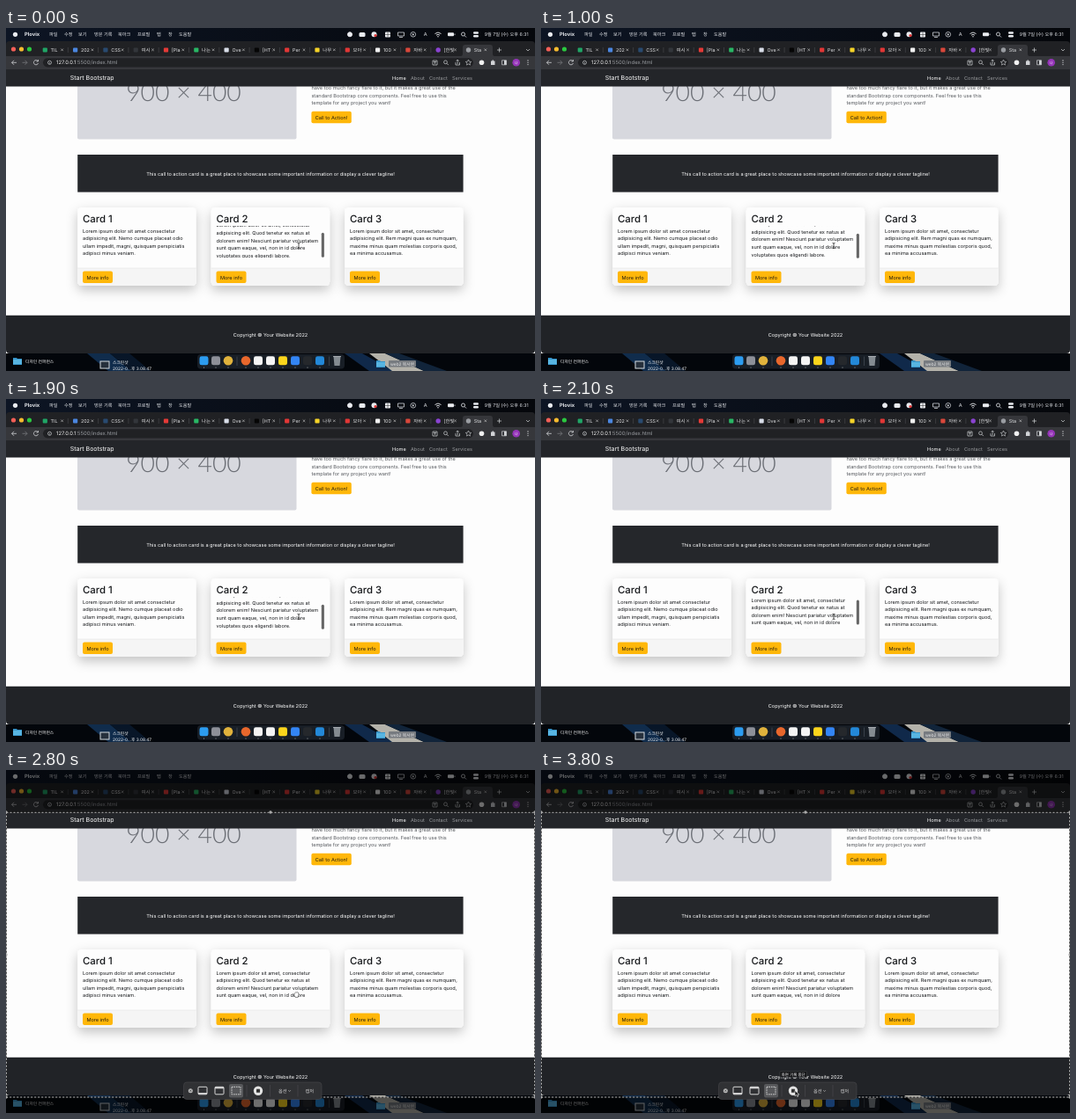
Recreate the animation shown at these times as an HTML page. Size 600 px wide and 390 px high, loop 3900 ms.

```html
<!DOCTYPE html>
<html lang="ko">
<head>
<meta charset="utf-8">
<title>Scrolling card</title>
<style>
html, body { margin: 0; width: 100%; height: 100%; overflow: hidden; background: #000; }
svg { display: block; width: 600px; height: 390px; font-family: Inter, "Noto Sans CJK KR", "Noto Sans CJK", sans-serif; }
text { text-rendering: geometricPrecision; }
</style>
</head>
<body>
<script>
const rect = (x, y, w, h, fill, more = '') =>
  `<rect x="${x}" y="${y}" width="${w}" height="${h}" fill="${fill}" ${more}/>`;
const dot = (x, y, r, fill, more = '') => `<circle cx="${x}" cy="${y}" r="${r}" fill="${fill}" ${more}/>`;
const line = (d, color, width = .8, more = '') =>
  `<path d="${d}" fill="none" stroke="${color}" stroke-width="${width}" ${more}/>`;
const shape = (d, fill, more = '') => `<path d="${d}" fill="${fill}" ${more}/>`;
const text = (x, y, str, size, fill, more = '') =>
  `<text x="${x}" y="${y}" font-size="${size}" fill="${fill}" ${more}>${str}</text>`;
const BODY = 5.6;
const lines = (x, y, rows, fill) => rows.map((row, i) => text(x, y + i * 8.57, row, BODY, fill)).join('');
const button = (x, y, w, label) =>
  rect(x, y, w, 13.6, '#ffb70a', 'rx="2"') + text(x + w / 2, y + 9, label, BODY, '#211c10', 'text-anchor="middle"');

function desktop() {
  const icons = [[224.5, '#2c9cf0'], [238, '#8d9099'], [252, '#e0b23c', 1], [272, '#e8672c', 1], [286, '#f4f4f4'],
    [300, '#f4f4f4'], [314, '#fbd51c'], [328, '#3385f5'], [342, '#25282c'], [356, '#2388d8']];
  const folder = (x, y) => shape(`M${x - 5} ${y - 4}h4l1 1h5v7h-10z`, '#3794c9') + rect(x - 5, y - 2, 10, 5, '#58b5e2');
  return rect(0, 365, 600, 25, '#03060b') +
    shape('M92 370H118L142 390H116z', '#102c4c') + shape('M118 370H140L164 390H142z', '#081628') +
    shape('M384 370H404L440 390H412z', '#10294a') + shape('M412 370H430L474 390H438z', '#b4b2aa') +
    shape('M430 370H446L500 390H474z', '#11243a') +
    folder(13, 379) + text(22, 381, '디자인 컨퍼런스', 4.8, '#fff') +
    rect(106.5, 378.5, 11, 9, '#d5dbe0') + rect(107.5, 379.5, 9, 7, '#26303c') +
    text(121, 382, '스크린샷', 4.8, '#fff') + text(121, 388.5, '2022-0…후 3.08.47', 4.8, '#fff') +
    folder(425, 382) + rect(434, 378, 31, 7.5, '#777b80', 'rx="1"') + text(436, 383.6, 'web2 복사본', 4.8, '#e8e8e8') +
    rect(217, 371, 167, 16.5, '#2a323c', 'rx="4" opacity=".55"') +
    icons.map(([x, c, round]) => round ? dot(x, 378.3, 5.3, c) : rect(x - 5, 373.3, 10, 10, c, 'rx="2.4"')).join('') +
    line('M262 373.5V384M366.5 373.5V384', '#5a636c', .5) +
    shape('M371.5 373.5h8l-1 10.5h-6z', '#848b91') + line('M371 373.5h9', '#c0c4c8', .8) +
    icons.map(([x]) => dot(x, 386, .5, '#ccc')).join('');
}

function menuBar() {
  const items = [[49, '파일'], [66, '수정'], [82, '보기'], [100, '방문 기록'], [127, '북마크'], [149, '프로필'],
    [171, '탭'], [184, '창'], [196, '도움말']];
  const ink = '#e9ebef';
  return rect(0, 0, 600, 20, 'url(#sky)') + dot(10.5, 7.3, 2.6, ink) +
    text(21, 9.3, 'Plovix', 5.8, ink, 'font-weight="700"') +
    items.map(([x, s]) => text(x, 9.2, s, 5.2, ink)).join('') +
    dot(390, 7.3, 2.5, ink, `stroke="${ink}"`) + rect(400.5, 5, 7, 5, ink, 'rx="1.5"') +
    dot(417.5, 7.3, 3, ink) + dot(419, 8.5, 1.6, '#d33') +
    rect(430, 4.5, 6, 6, ink, 'rx="1"') + line('M433 4.5v6M430 7.5h6', '#222', .5) +
    line('M444.5 5h7v4h-7zM446 10.5h4', ink, .7) +
    dot(461.8, 7.3, 2.8, 'none', `stroke="${ink}" stroke-width=".7"`) + shape('M461 5.9v2.8l2-1.4z', ink) +
    text(473.8, 9.3, 'A', 5.6, ink) +
    line('M486.5 6.5q3.5-3 7 0M488 8.2q2-1.8 4 0', ink, .9) + dot(490, 9.7, .7, ink) +
    rect(501, 5.3, 7, 4, ink, 'rx="1"') + line('M509 6.5v1.6', ink, .7) +
    dot(518.5, 7, 2, 'none', `stroke="${ink}" stroke-width=".8"`) + line('M520 8.5l2 2', ink) +
    rect(530, 4.3, 6, 2.5, ink, 'rx="1.2"') + rect(530, 8, 6, 2.5, ink, 'rx="1.2"') +
    text(592.5, 9.3, '9월 7일 (수) 오후 6:31', 5.2, ink, 'text-anchor="end"');
}

function browserBars() {
  const tabs = [['TIL', '#20a566'], ['202', '#4b86df'], ['CSS', '#294a70'], ['여시', '#33363b'], ['[Pla', '#e33a37'],
    ['나는', '#29b765'], ['Ove', '#d8dde8'], ['[HT', '#050505'], ['Per', '#e13736'], ['나무', '#f5d328'],
    ['모아', '#e13736'], ['100', '#f1f1f1'], ['자바', '#d9473b'], ['[한빛', '#8a43d1'], ['Sta', '#9a9da2']];
  const ink = '#d2d4d7';
  return rect(0, 15, 600, 40, '#202124', 'rx="4"') +
    ['#f65f57', '#f9bc2f', '#2bc840'].map((c, i) => dot(8.5 + 9 * i, 24, 2.6, c)).join('') +
    shape('M516 32q2 0 2-3v-7q0-3 3-3h28q3 0 3 3v7q0 3 2 3z', '#36373b') +
    tabs.map(([label, c], i) => {
      const x = 44.3 + 34.3 * i;
      return (i < 13 ? rect(x - 2.6, 22.4, 5.2, 5.2, c, 'rx="1"') : dot(x, 25, 2.7, c)) +
        text(x + 6.3, 27, label, 5.4, '#e2e3e5') + line(`M${x + 18} 23.5l2.6 2.6M${x + 20.6} 23.5l-2.6 2.6`, '#ccc', .6) +
        (i < 13 ? line(`M${x + 26} 22v6`, '#54565a', .5) : '');
    }).join('') +
    line('M557 25h5M559.5 22.5v5M590 24l2 2l2-2', ink, .7) +
    rect(0, 32, 600, 15, '#36373b') + rect(42, 34.2, 488, 10.2, '#202124', 'rx="5.1"') +
    line('M12 39.3H6.5M9 36.8l-2.5 2.5l2.5 2.5', ink) + line('M18.5 39.3H24M21.5 36.8l2.5 2.5l-2.5 2.5', '#77797d') +
    line('M36 37.5a2.6 2.6 0 1 0 .5 2.5M36.5 36v2h-2', ink) +
    dot(49.5, 39.3, 2, 'none', `stroke="${ink}" stroke-width=".7"`) + line('M49.5 39v1.4', ink, .6) +
    text(57, 41.4, '127.0.0.1<tspan fill="#999ca1">:5500/index.html</tspan>', 5.9, '#eee') +
    line('M484 37h5v5h-5zM485 38.5h3M486.5 38.5v2.5', ink, .7) +
    dot(498.5, 38.8, 1.9, 'none', `stroke="${ink}" stroke-width=".7"`) + line('M500 40.3l1.8 1.8', ink) +
    line('M510 39v3h4.5v-3M512.2 41v-5M510.7 37.5l1.5-1.5l1.5 1.5', ink, .7) +
    shape('M524.5 36l1 2.2l2.2 .2l-1.7 1.5l.5 2.2l-2-1.2l-2 1.2l.5-2.2l-1.7-1.5l2.2-.2z', 'none', `stroke="${ink}" stroke-width=".6"`) +
    dot(539.5, 39.3, 2.8, '#f1f1f1') + shape('M550 37.5h1.5v-1h1.5v1h1.5v4.5h-4.5z', ink) +
    line('M562.5 36.8h5v5h-5z', ink, .7) + rect(565, 36.8, 2.5, 5, ink) +
    dot(578.7, 39.3, 4.3, '#9635b9') + text(578.7, 40.8, '나', 4, '#fff', 'text-anchor="middle"') +
    [37, 39.3, 41.6].map(y => dot(592, y, .65, ink)).join('');
}

function card(x, title, body) {
  return rect(x, 204, 134.4, 89, '#fdfdfd', 'rx="4.5" filter="url(#shadow)"') +
    shape(`M${x} 273h134.4v15.5q0 4.5-4.5 4.5h-125.4q-4.5 0-4.5-4.5z`, '#f5f5f5') +
    line(`M${x} 273h134.4`, '#dcdcdc', .5) +
    text(x + 5.8, 220.8, title, 11.4, '#16181b', 'font-weight="500"') + body +
    button(x + 5.8, 276.5, 34, 'More info');
}

function page() {
  const ink = '#16181b';
  const links = [[438, 'Home', '#fff'], [459, 'About', '#97999c'], [480, 'Contact', '#97999c'], [506, 'Services', '#97999c']];
  return rect(0, 47, 600, 323, '#fdfdfd') + rect(81, 47, 248.5, 79.5, '#d7d8de', 'rx="2"') +
    text(201.5, 82.8, '900 × 400', 28.4, '#6b6e75', 'text-anchor="middle" font-weight="300" font-family="Lato, sans-serif"') +
    lines(346.4, 70, ['have too much fancy flare to it, but it makes a great use of the',
      'standard Bootstrap core components. Feel free to use this', 'template for any project you want!'], '#55585d') +
    button(346.4, 94.7, 45.4, 'Call to Action!') +
    rect(0, 47, 600, 19.5, '#232529') + text(72.8, 59.2, 'Start Bootstrap', 7, '#fff') +
    links.map(([x, s, c]) => text(x, 58.9, s, BODY, c)).join('') +
    rect(81.2, 144, 437.4, 42.6, '#25272b') +
    text(300, 167.5, 'This call to action card is a great place to showcase some important information or display a clever tagline!',
      BODY, '#fff', 'text-anchor="middle"') +
    card(81.2, 'Card 1', lines(87, 232.6, ['Lorem ipsum dolor sit amet consectetur',
      'adipisicing elit. Nemo cumque placeat odio', 'ullam impedit, magni, quisquam perspiciatis', 'adipisci minus veniam.'], ink)) +
    card(232.7, 'Card 2', `<g clip-path="url(#body)"><g id="copy">${lines(238.5, 232.6, ['Lorem ipsum dolor sit amet, consectetur',
      'adipisicing elit. Quod tenetur ex natus at', 'dolorem enim! Nesciunt pariatur voluptatem',
      'sunt quam eaque, vel, non in id dolore', 'voluptates quos eligendi labore.'], ink)}</g></g>` +
      rect(357.8, 226.5, 3.1, 28, '#666', 'rx="1.5" id="thumb"')) +
    card(384.2, 'Card 3', lines(390, 232.6, ['Lorem ipsum dolor sit amet, consectetur',
      'adipisicing elit. Rem magni quas ex numquam,', 'maxime minus quam molestias corporis quod,', 'ea minima accusamus.'], ink)) +
    shape('M0 326.7h600v39.3q0 4-4 4h-592q-4 0-4-4z', '#212327') +
    text(300, 350.8, 'Copyright © Your Website 2022', BODY, '#fff', 'text-anchor="middle"');
}

function recorder() {
  const ink = '#d6d6d6';
  const handles = [0, 300, 600].flatMap(x => [48, 210, 372].filter(y => x !== 300 || y !== 210).map(y => dot(x, y, 1.7, '#aaa')));
  return rect(0, 0, 600, 48, '#000', 'opacity=".55"') + rect(0, 372, 600, 18, '#000', 'opacity=".55"') +
    line('M.5 48.3H599.5V372H.5z', '#222', .8) + line('M.5 48.3H599.5V372H.5z', '#ddd', .8, 'stroke-dasharray="2 2"') + handles.join('') +
    rect(201.5, 355, 156.5, 19.5, '#303134', 'rx="3.5" stroke="#4c4d50" stroke-width=".5"') +
    dot(209.3, 364.7, 2.5, '#b9b9b9') + line('M208.3 363.7l2 2M210.3 363.7l-2 2', '#303134', .6) +
    rect(253, 357, 16, 15.5, '#57585b', 'rx="2"') +
    rect(218, 360.3, 10, 8.5, 'none', `rx="1" stroke="${ink}"`) + rect(218, 367, 10, 1.8, ink) +
    rect(237, 360.3, 10, 8.5, 'none', `rx="1" stroke="${ink}"`) + rect(237, 360.3, 10, 2, ink) +
    rect(256, 360.3, 10, 8.5, 'none', `stroke="${ink}" stroke-dasharray="1.5 1"`) +
    line('M273 358v13.5M299.5 358v13.5M331 358v13.5', '#505154', .5) +
    dot(286, 364.8, 5.2, '#e3e3e3') + rect(284, 362.8, 4, 4, '#333', 'rx=".5"') +
    text(309, 366.7, '옵션', 5.2, ink) + line('M320.3 364.2l1.3 1.3l1.3-1.3', ink, .6) + text(339.5, 366.7, '캡처', 5.2, ink) +
    `<g id="tip">${rect(271, 342.5, 30.5, 6.8, '#17181a', 'rx="1" stroke="#54565a" stroke-width=".4"')}${
      text(286.2, 347.6, '화면 기록 중단', 4.4, '#fff', 'text-anchor="middle"')}</g>`;
}

const beam = line('M-1.5-3.2Q0-3.2 0-2V2Q0 3.2-1.5 3.2M1.5-3.2Q0-3.2 0-2M0 2Q0 3.2 1.5 3.2', '#111', .7);
const hand = shape('M-2-1.5Q-1-3 0-2.4Q1-3.4 1.6-2.2Q3-2.4 2.6 0L1.8 3H-1.2L-2.6 .6z', '#fff', 'stroke="#111" stroke-width=".5"');
const arrow = shape('M-1-3V3.2L.6 1.8L1.7 4L2.8 3.5L1.8 1.4H3.8z', '#111', 'stroke="#fff" stroke-width=".6"');

document.body.innerHTML = `<svg viewBox="0 0 600 390"><defs>
  <filter id="shadow" x="-30%" y="-30%" width="160%" height="170%"><feDropShadow dx="0" dy="5" stdDeviation="6.5" flood-opacity=".23"/></filter>
  <linearGradient id="sky"><stop stop-color="#0d1524"/><stop offset="1" stop-color="#05070b"/></linearGradient>
  <clipPath id="body"><rect x="233" y="225" width="124" height="36"/></clipPath></defs>
  ${desktop()}${menuBar()}${browserBars()}${page()}<g id="recorder">${recorder()}</g>
  <g id="cursor"><g id="beam">${beam}</g><g id="hand">${hand}</g><g id="arrow">${arrow}</g></g></svg>`;

const $ = id => document.getElementById(id);
const show = (id, on) => $(id).setAttribute('display', on ? 'inline' : 'none');
const move = (id, x, y) => $(id).setAttribute('transform', `translate(${x} ${y})`);

// Eased value between [time, value] keys.
function at(t, keys) {
  const i = keys.findIndex(k => k[0] > t);
  if (i < 0) return keys[keys.length - 1][1];
  if (!i) return keys[0][1];
  const [t0, a] = keys[i - 1], [t1, b] = keys[i], p = (t - t0) / (t1 - t0);
  return a + (b - a) * p * p * (3 - 2 * p);
}

const scroll = [[0, 6.2], [400, 0], [650, 0], [950, 7.3], [1900, 7.3], [2200, 0]];
const thumbFade = [[2500, 1], [2700, .5], [2800, 0]];
const cursorX = [[2700, 332], [3250, 302], [3400, 302], [3700, 289]];
const cursorY = [[2700, 247.5], [3250, 338], [3400, 338], [3700, 367.5]];

function draw(now) {
  const t = Math.floor(now % 3900 / 100) * 100;
  const y = at(t, scroll), recording = t >= 2800;
  move('copy', 0, -y);
  move('thumb', 0, y);
  $('thumb').setAttribute('opacity', at(t, thumbFade));
  move('cursor', at(t, cursorX), at(t, cursorY));
  show('recorder', recording);
  show('tip', t >= 3700);
  show('beam', !recording);
  show('hand', recording && t < 3500);
  show('arrow', t >= 3500);
  requestAnimationFrame(draw);
}
draw(performance.now());
</script>
</body>
</html>
```
